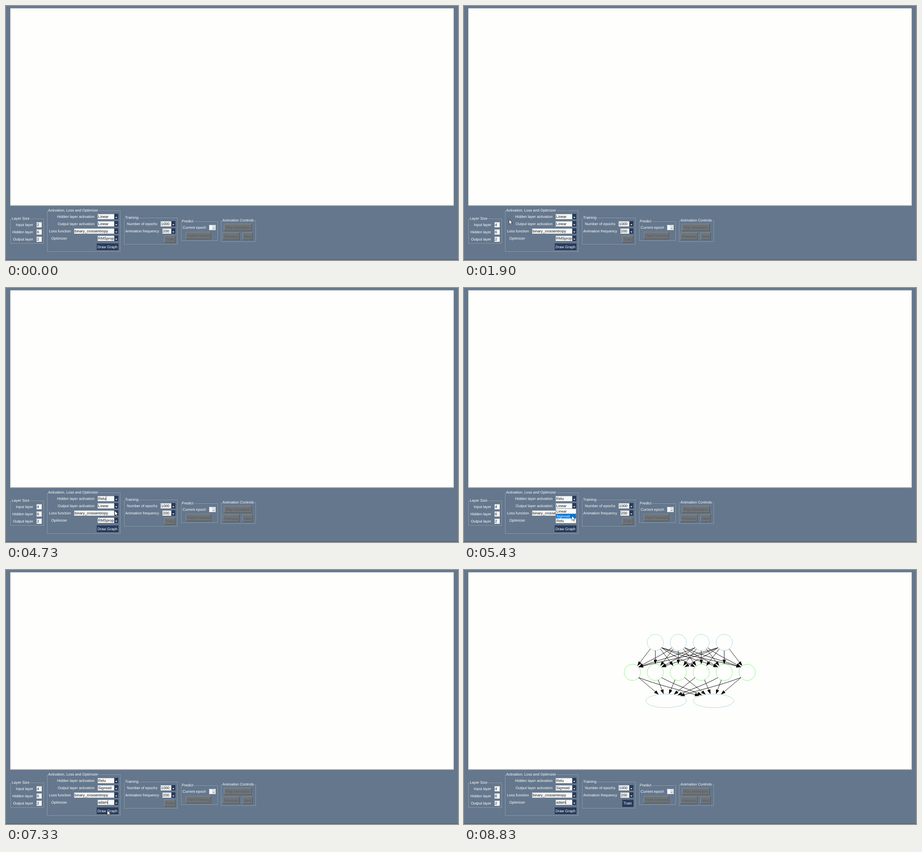
An HTML page that plays this animation: 998 px wide and 561 px high, repeating every 8890 ms.

```html
<!DOCTYPE html>
<html lang="en">
<head>
<meta charset="utf-8">
<title>Network designer</title>
<style>
  html, body { margin: 0; width: 100%; height: 100%; overflow: hidden; background: #64778d; }
  svg { display: block; width: 100%; height: 100%; }
  text { font: 8.2px "Liberation Sans", Arial, sans-serif; text-rendering: geometricPrecision; }
</style>
</head>
<body>
<svg id="stage" viewBox="0 0 998 561"></svg>
<script>
const LOOP = 8890;
const BG = '#64778d', NAVY = '#283b5b', FIELD = '#f7f9fa', PAPER = '#fefefc';
const stage = document.getElementById('stage');

function add(tag, attrs, parent = stage) {
  const node = document.createElementNS('http://www.w3.org/2000/svg', tag);
  for (const key in attrs) node.setAttribute(key, attrs[key]);
  parent.append(node);
  return node;
}
const rect = (x, y, x2, y2, fill, parent) =>
  add('rect', { x, y, width: x2 - x, height: y2 - y, fill }, parent);
const path = (d, attrs, parent) => add('path', { d, fill: 'none', ...attrs }, parent);

// Text is placed by the middle of its line.
function text(str, x, y, fill = '#fff', anchor = 'start', parent = stage) {
  const node = add('text', { x, y: y + 3, fill, 'text-anchor': anchor }, parent);
  node.textContent = str;
  return node;
}
const show = (node, on) => node.setAttribute('visibility', on ? 'visible' : 'hidden');

function bevel(x, y, x2, y2, light, dark, parent) {
  path(`M${x + .5} ${y2 - .5}V${y + .5}H${x2 - .5}`, { stroke: light, 'stroke-width': .8 }, parent);
  path(`M${x + .5} ${y2 - .5}H${x2 - .5}V${y + .5}`, { stroke: dark, 'stroke-width': .8 }, parent);
}

function group(title, labelX, width, x, y, x2, y2) {
  for (const [shift, stroke] of [[0, '#4c5b6d'], [.8, '#a3b3c0']])
    add('rect', { x: x + shift, y: y + shift, width: x2 - x - .8, height: y2 - y - .8,
      fill: 'none', stroke, 'stroke-width': .8 });
  rect(labelX - 1, y - 4, labelX + width + 1, y + 5, BG);
  text(title, labelX, y);
}

function field(x, y, x2, value) {
  rect(x, y - 6, x2, y + 6, FIELD);
  bevel(x, y - 6, x2, y + 6, '#7d8791', '#d5dadf');
  return text(value, x + 1.6, y, '#111');
}

function combo(x, y, x2, value) {
  const label = field(x, y, x2, value);
  rect(x2 - 9, y - 6, x2, y + 6, NAVY);
  path(`M${x2 - 6.8} ${y + 1}h4.6l-2.3 2.5z`, { fill: '#fff' });
  return label;
}

function button(label, x, y, x2, y2, enabled) {
  const g = add('g', {});
  rect(x, y, x2, y2, enabled ? NAVY : '#6e7478', g);
  bevel(x, y, x2, y2, enabled ? '#44597a' : '#8d9598', enabled ? '#17243a' : '#454b52', g);
  text(label, (x + x2) / 2, (y + y2) / 2, enabled ? '#fff' : '#565b60', 'middle', g);
  return g;
}

function dropdown(y, items) {
  const g = add('g', {});
  rect(202, y, 248, y + 33, '#5c6670', g);
  rect(202.7, y + .7, 247.3, y + 32.3, '#fff', g);
  const bar = rect(202.7, 0, 247.3, 10.4, '#0078d7', g);
  const labels = items.map((item, i) => text(item, 204, y + 6 + i * 10.5, '#111', 'start', g));
  return (open, active) => {
    show(g, open);
    bar.setAttribute('y', y + 1 + active * 10.5);
    labels.forEach((label, i) => label.setAttribute('fill', i === active ? '#fff' : '#111'));
  };
}

// Window and canvas
rect(0, 0, 998, 561, BG);
rect(0, 560, 998, 561, '#4d5869');
rect(9, 4.5, 989, 441.5, '#abb0b1');
rect(10, 5.5, 988, 440, PAPER);

// Control panel
group('Layer Size', 13, 40, 9, 469, 83, 524);
['Input layer', 'Hidden layer', 'Output layer'].forEach((name, i) =>
  text(name, 60, 483 + i * 16, '#fff', 'end'));
const inputSize = field(67, 483, 79, '2');
field(67, 499, 79, '6');
field(67, 515, 79, '2');

group('Activation, Loss and Optimizer', 93, 111, 90, 451, 252, 542);
text('Hidden layer activation', 195.5, 465, '#fff', 'end');
text('Output layer activation', 195.5, 481, '#fff', 'end');
text('Loss function', 95, 497);
text('Optimizer', 100, 513);
const hiddenAct = combo(202, 465, 248, 'Linear');
const outputAct = combo(202, 481, 248, 'Linear');
combo(150, 497, 248, 'binary_crossentropy');
const optimizer = combo(202, 513, 248, 'RMSprop');
button('Draw Graph', 200, 524, 248, 539, true);

group('Training', 263, 29, 260, 467, 378, 526);
text('Number of epochs', 334, 481, '#fff', 'end');
text('Animation frequency', 338, 497, '#fff', 'end');
combo(341, 481, 374, '1000');
combo(345, 497, 374, '200');
button('Train', 349, 507, 374, 523, false);
const trainOn = button('Train', 349, 507, 374, 523, true);

group('Predict', 388, 26, 386, 475, 467, 518);
text('Current epoch', 390, 489);
field(448, 489, 463, '');
rect(455, 484, 462, 494.5, '#dfe2e3');
path('M456.5 490.5h4l-2 2z', { fill: '#7d8388' });
button('Feed Forward', 397, 499, 453, 515, false);

group('Animation Controls', 478, 69, 474, 473, 551, 520);
button('Play Animation', 481, 481, 543, 497, false);
button('Previous', 478, 500, 516, 517, false);
button('Next', 522, 500, 545, 517, false);

const caret = rect(0, 0, .8, 9, '#111');

// Network graph
const graph = add('g', {});
const row = (count, y, gap, rx, ry, color) => Array.from({ length: count }, (_, i) =>
  ({ x: 498.5 + (i - (count - 1) / 2) * gap, y, rx, ry, color }));
const layers = [
  row(4, 160, 50.7, 18, 18, '#add8e6'),
  row(6, 226, 50.7, 18, 18, '#90ee90'),
  row(2, 289, 104.5, 45, 15, '#add8e6')
];

// Point on a node's outline; flat directions on circles are steepened.
function outline(node, dx, dy) {
  if (node.rx === node.ry) dy = Math.sign(dy) * Math.max(Math.abs(dy), Math.abs(dx) * .84);
  const k = 1 / Math.hypot(dx / node.rx, dy / node.ry);
  return [node.x + dx * k, node.y + dy * k];
}

function edge(a, b) {
  const dx = b.x - a.x, dy = b.y - a.y;
  const [x1, y1] = outline(a, dx, dy), [x2, y2] = outline(b, -dx, -dy);
  const w = x2 - x1, h = y2 - y1, len = Math.hypot(w, h);
  const ux = w / len, uy = h / len;
  const bx = x2 - ux * 10, by = y2 - uy * 10;
  const bend = Math.abs(dx) > 90 ? .42 : 1 / 3;
  path(`M${x1} ${y1}C${x1 + w / 3} ${y1 + h * bend} ${bx - w / 3} ${by - h / 3} ${bx} ${by}`,
    { stroke: '#111' }, graph);
  path(`M${x2} ${y2}L${bx - uy * 3.6} ${by + ux * 3.6}L${bx + uy * 3.6} ${by - ux * 3.6}z`,
    { fill: '#000' }, graph);
}

layers.flat().forEach(n => add('ellipse',
  { cx: n.x, cy: n.y, rx: n.rx, ry: n.ry, fill: 'none', stroke: n.color }, graph));
for (let i = 0; i < 2; i++)
  for (const a of layers[i]) for (const b of layers[i + 1]) edge(a, b);

const hiddenList = dropdown(471, ['Linear', 'Sigmoid', 'Relu']);
const outputList = dropdown(487, ['Linear', 'Sigmoid', 'Relu']);
const optimizerList = dropdown(519, ['RMSprop', 'SGD', 'adam']);

const pointer = path('M0 0V10.6L2.5 8.3L4.2 12.2L6 11.4L4.3 7.6H7.6Z',
  { fill: '#fff', stroke: '#111', 'stroke-width': .7 });

// Pointer stops: time, x, y
const stops = [
  [0, 40, 575], [450, 40, 575], [900, 73, 481], [1500, 73, 481], [1900, 99.5, 471.5],
  [2500, 243, 464], [2900, 243, 464], [3430, 242, 489], [3800, 241, 497], [4450, 240, 497],
  [4730, 240, 492], [4950, 243, 480], [5100, 243, 480], [5400, 238, 503], [5700, 238, 503],
  [6230, 244, 513], [6400, 244, 513], [6750, 235, 545], [6980, 235, 545], [7330, 223.5, 531],
  [7950, 224, 532], [8600, 245, 575], [LOOP, 245, 575]
];

function pointerAt(t) {
  const i = Math.max(1, stops.findIndex(s => s[0] > t));
  const [t0, x0, y0] = stops[i - 1], [t1, x1, y1] = stops[i];
  const p = (t - t0) / (t1 - t0), e = p * p * (3 - 2 * p);
  return [x0 + (x1 - x0) * e, y0 + (y1 - y0) * e];
}

function placeCaret(x, y) {
  caret.setAttribute('x', x);
  caret.setAttribute('y', y - 4.5);
}

function render(t) {
  const [x, y] = pointerAt(t);
  pointer.setAttribute('transform', `translate(${x} ${y})`);

  inputSize.textContent = t < 1150 ? '2' : t < 1350 ? '' : '4';
  hiddenAct.textContent = t < 4100 ? 'Linear' : 'Relu';
  outputAct.textContent = t < 5600 ? 'Linear' : 'Sigmoid';
  optimizer.textContent = t < 6920 ? 'RMSprop' : 'adam';

  const hover = top => Math.max(0, Math.min(2, Math.floor((y - top - 1) / 10.5)));
  hiddenList(t >= 2750 && t < 4100, hover(471));
  outputList(t >= 5050 && t < 5600, hover(487));
  optimizerList(t >= 6330 && t < 6920, hover(519));

  show(caret, (t >= 1000 && t < 1600) || (t >= 4100 && t < 5050) ||
    (t >= 5600 && t < 6330) || t >= 6920);
  if (t < 4100) placeCaret(t >= 1150 && t < 1350 ? 69 : 73.5, 483);
  else if (t < 5600) placeCaret(220.6, 465);
  else if (t < 6920) placeCaret(233, 481);
  else placeCaret(224.4, 513);

  show(graph, t >= 7560);
  show(trainOn, t >= 7560);
}

const start = performance.now();
function tick() {
  render((performance.now() - start) % LOOP);
  requestAnimationFrame(tick);
}
tick();
</script>
</body>
</html>
```
